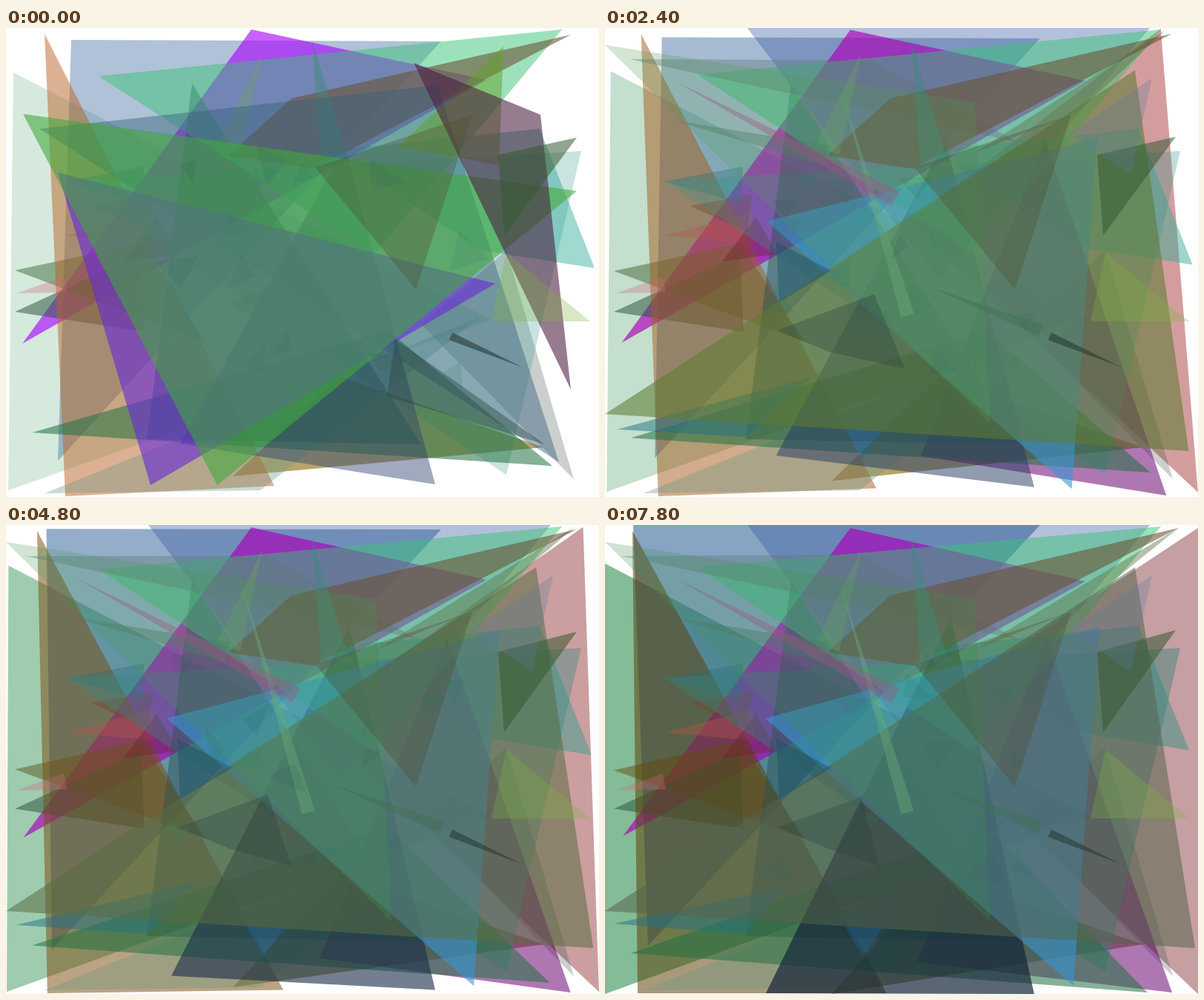
Write an HTML page with a canvas that moves like this. It is 800 px wide and 633 px high and loops after 8 s.

```html
<!DOCTYPE html>
<html lang="en">
<head>
<meta charset="utf-8">
<title>Translucent triangles</title>
<style>
  html, body { margin: 0; width: 100%; height: 100%; overflow: hidden; background: #fff; }
  canvas { display: block; width: 800px; height: 633px; }
</style>
</head>
<body>
<canvas id="stage" width="800" height="633"></canvas>
<script>
const ctx = document.getElementById('stage').getContext('2d');
const LOOP = 8000, STEP = 300, LAST = 7800, SWAP = 600;
const shapes = [];

const lerp = (a, b, p) => a + (b - a) * p;
const smooth = p => p * p * (3 - 2 * p);

// when: 'early' or 'late' (around SWAP); by: drift of each coordinate over the loop;
// tint and fade: colour and alpha reached at the end.
function shape(rgb, alpha, pts, { by = [], tint = rgb, fade = alpha, when } = {}) {
  shapes.push({ rgb, alpha, pts, by, tint, fade, when });
}
const early = { when: 'early' }, late = { when: 'late' };

// A thin triangle from its tip to a far end of the given width
function needle(rgb, alpha, x, y, ex, ey, width, opt) {
  const len = Math.hypot(ex - x, ey - y);
  const nx = (ey - y) / len * width / 2, ny = (x - ex) / len * width / 2;
  shape(rgb, alpha, [x, y, ex + nx, ey + ny, ex - nx, ey - ny], opt);
}

// Pale backdrop
shape([40, 138, 75], .19, [10, 60, 3, 624, 655, 394],
  { by: [-10, -8, -3, 9], fade: .57 });
shape([45, 95, 150], .38, [88, 16, 587, 18, 70, 584],
  { by: [-50, -16, 0, -18, -12, -16], fade: .57 });
shape([55, 90, 160], .38, [192, 0, 735, 0, 450, 340], late);
shape([175, 60, 60], .5, [735, 0, 800, 625, 410, 262],
  { by: [65, 4, 0, 8], tint: [140, 65, 68], when: 'late' });
shape([65, 180, 160], .5, [720, 136, 794, 324, 640, 300, 440, 165],
  { by: [0, 0, -6, -20, 0, -20], tint: [60, 145, 135] });
shape([135, 105, 10], .6, [306, 605, 725, 566, 450, 470],
  { by: [0, 28], tint: [105, 110, 20] });
shape([70, 85, 75], .28, [766, 609, 675, 300, 560, 400]);

// Magenta wedge, then the purple one
const wedge = [331, 2, 648, 70, 22, 426];
shape([170, 0, 255], .62, wedge, early);
shape([172, 0, 185], .66, wedge, { by: [0, 2, 0, 6, 2, -6], when: 'late' });
shape([108, 5, 112], .54, [593, 150, 755, 631, 427, 574],
  { by: [3, 4, 10, 0, -6, 16], when: 'late' });

// Left side
shape([60, 110, 60], .5, [12, 327, 182, 291, 270, 424],
  { by: [0, 4], tint: [105, 80, 20] });
shape([50, 90, 70], .55, [12, 383, 182, 305, 187, 410]);
shape([185, 100, 40], .5, [52, 8, 80, 632, 362, 618],
  { by: [-15, 0, -36, 0, 18, 14], tint: [95, 68, 10], fade: .54 });
shape([105, 150, 130], .35, [52, 628, 343, 624, 640, 390]);
needle([205, 100, 120], .32, 15, 358, 80, 346, 22);
needle([185, 85, 75], .36, 82, 280, 200, 270, 42);
needle([130, 60, 45], .38, 115, 240, 195, 250, 52);
needle([110, 30, 50], .4, 158, 315, 218, 280, 58);
needle([40, 110, 120], .35, 80, 207, 185, 212, 50);

// Wide teal sheet over the wedge
shape([60, 155, 145], .28, [80, 206, 776, 166, 675, 603],
  { tint: [55, 130, 120], fade: .45 });

// Dark triangle, lower greens and the growing dark wedge
shape([45, 80, 82], .46, [251, 75, 190, 555, 560, 562]);
shape([35, 113, 68], .55, [35, 546, 515, 408, 737, 591],
  { by: [0, 32, 0, 0, -5, 40] });
shape([35, 115, 130], .5, [18, 543, 290, 465, 190, 552],
  { by: [-6, -5, -50, 25], when: 'late' });
shape([45, 65, 112], .45, [235, 561, 579, 616, 457, 160],
  { by: [-18, 71, 0, 17, 10, -36], tint: [20, 38, 58], fade: .7 });

// Upper band
shape([55, 195, 118], .49, [125, 65, 750, 2, 497, 305], { by: [0, -8] });
shape([95, 115, 120], .38, [36, 42, 365, 45, 556, 154],
  { by: [-14, 0, -18, -5], when: 'late' });
shape([95, 115, 70], .45, [750, 3, 500, 168, 640, 112],
  { by: [25], when: 'late' });
shape([106, 82, 50], .58, [762, 9, 385, 95, 300, 172, 415, 190], { by: [12, -5] });
needle([60, 138, 125], .45, 413, 17, 444, 185, 38);
needle([110, 160, 100], .35, 346, 33, 300, 165, 34);
needle([80, 115, 108], .42, 95, 125, 298, 172, 28, late);

// Opening sheets
shape([55, 95, 125], .45, [45, 136, 582, 77, 746, 586], early);
shape([105, 45, 215], .62, [70, 195, 660, 345, 195, 617], early);
shape([65, 170, 60], .58, [23, 116, 770, 220, 285, 617], early);
shape([100, 160, 40], .5, [671, 25, 530, 160, 665, 185], early);
shape([75, 30, 62], .58, [550, 47, 721, 117, 762, 488], early);
shape([45, 65, 60], .42, [525, 420, 727, 562, 514, 497], early);

// Blue and olive giants
shape([55, 150, 212], .59, [219, 261, 663, 152, 629, 622],
  { by: [-3, 0, 4, -15, 3], when: 'late' });
shape([98, 130, 45], .58, [0, 521, 715, 57, 785, 571],
  { by: [0, 0, 0, 0, 11], tint: [88, 98, 76], fade: .53, when: 'late' });
shape([80, 160, 78], .25, [0, 23, 499, 100, 520, 535],
  { tint: [60, 145, 82], when: 'late' });

// Right side
shape([82, 78, 50], .35, [417, 188, 629, 117, 553, 353]);
shape([55, 90, 50], .55, [770, 148, 664, 171, 672, 280], { by: [0, -6] });
shape([125, 180, 60], .3, [675, 303, 788, 396, 655, 396]);
needle([90, 120, 160], .28, 738, 68, 668, 170, 100, late);
needle([40, 60, 55], .6, 697, 458, 600, 416, 11);

// Inner slivers
needle([105, 170, 120], .42, 320, 88, 408, 388, 18, late);
needle([155, 85, 125], .4, 95, 72, 392, 230, 22, late);
needle([22, 78, 100], .42, 235, 370, 268, 308, 84, late);
needle([60, 110, 75], .4, 440, 350, 588, 408, 16, late);
shape([45, 66, 65], .35, [368, 357, 415, 460, 302, 437, 232, 408],
  { by: [-22, 10, -45], when: 'late' });
needle([30, 100, 160], .35, 347, 582, 349, 543, 50, late);

// Small shards scattered anew every few steps
function random(seed) {
  return () => {
    seed = (seed * 16807) % 2147483647;
    return seed / 2147483647;
  };
}
function drawShards(t) {
  const rnd = random(977 + 31 * Math.floor(t / 1200));
  for (let i = 0; i < 14; i++) {
    const x = 230 + rnd() * 400, y = 180 + rnd() * 290, turn = rnd() * 6.3;
    fill([50, 85 + rnd() * 45, 95], .16, [0, 1, 2].flatMap(k => {
      const r = 8 + rnd() * 28, a = turn + k * 2.1;
      return [x + r * Math.cos(a), y + r * Math.sin(a)];
    }));
  }
}

function fill(rgb, alpha, pts) {
  ctx.fillStyle = `rgba(${rgb.map(Math.round)},${alpha})`;
  ctx.beginPath();
  for (let i = 0; i < pts.length; i += 2) ctx.lineTo(pts[i], pts[i + 1]);
  ctx.fill();
}

function draw(t) {
  const p = smooth(t / LAST);
  const phase = t < SWAP ? 'early' : 'late';
  ctx.fillStyle = '#fff';
  ctx.fillRect(0, 0, 800, 633);
  for (const s of shapes) {
    if (s.when && s.when !== phase) continue;
    fill(s.rgb.map((c, i) => lerp(c, s.tint[i], p)),
      lerp(s.alpha, s.fade, p),
      s.pts.map((v, i) => v + (s.by[i] || 0) * p));
  }
  drawShards(t);
}

let start = null, shown = -1;
function tick(now) {
  if (start === null) start = now;
  const t = Math.floor(((now - start) % LOOP) / STEP) * STEP;
  if (t !== shown) draw(shown = t);
  requestAnimationFrame(tick);
}
draw(0);
requestAnimationFrame(tick);
</script>
</body>
</html>
```
